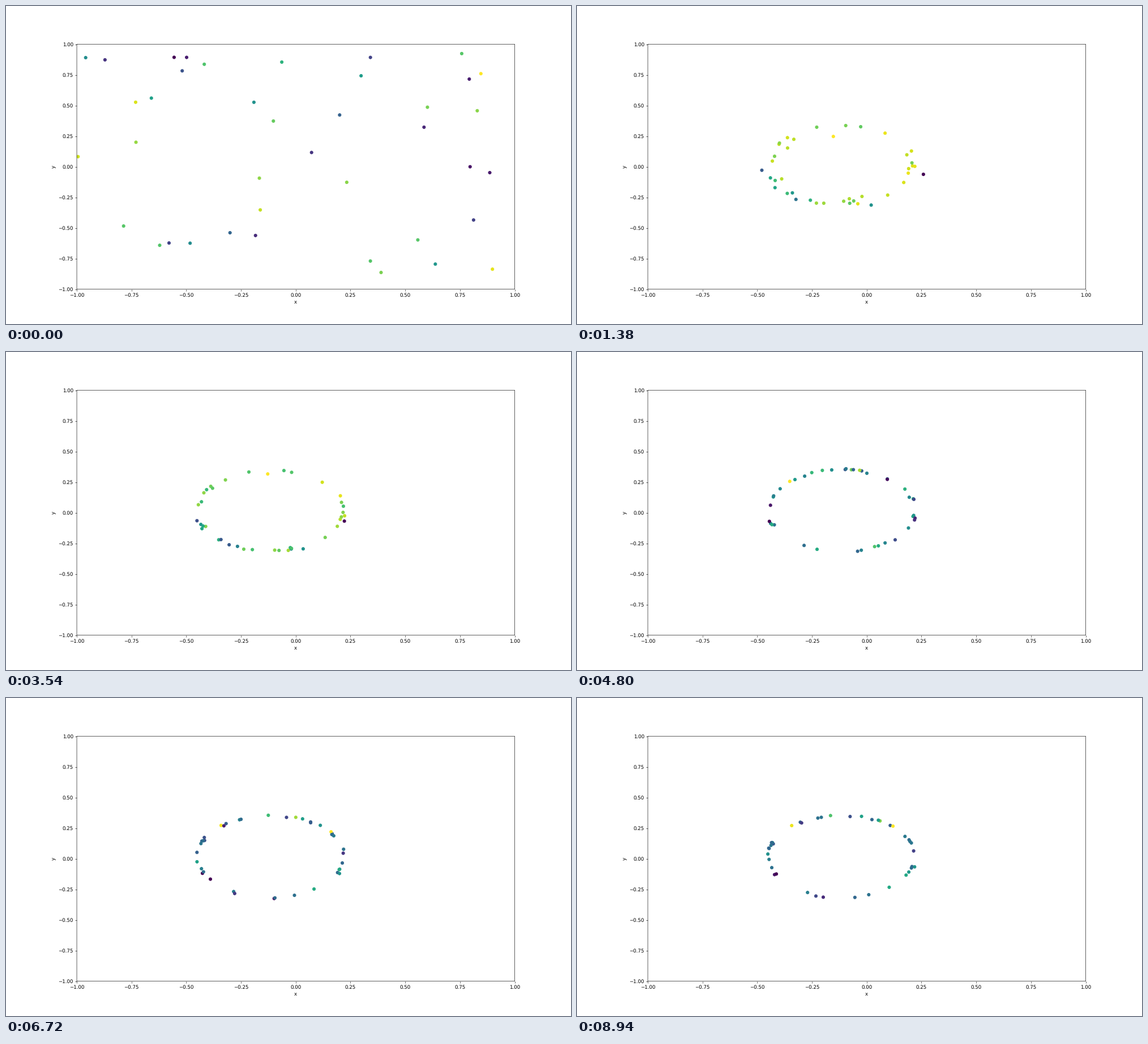
A matplotlib script for the animation above (9000 ms loop, 998 px wide and 561 px high).

```python
import numpy as np
import matplotlib.pyplot as plt
from matplotlib.animation import FuncAnimation

W, H, DPI = 998, 561, 62.375
FRAMES, STEP = 150, 60
COUNT = 40
CENTRE = np.array([-0.114, 0.016])
RADIUS = 0.336
SPIN = np.radians(9.93)   # orbit speed per frame
GATHER = 23               # frames until the swarm has formed a ring

# Soft thin lines and unhinted text
plt.rcParams.update({
    "path.snap": False, "text.hinting": "none", "axes.linewidth": 0.72,
    "xtick.major.width": 0.72, "ytick.major.width": 0.72})

rng = np.random.default_rng(12)
start = rng.uniform(-1, 1, (COUNT, 2))
height = rng.uniform(0, 1, COUNT)
dx, dy = ((start - CENTRE) / RADIUS).T
angle0, reach0 = np.arctan2(dy, dx), np.hypot(dx, dy)

sense = np.where(np.arange(COUNT) % 2, 1, -1)
speed = SPIN * (1 + rng.normal(0, 0.01, COUNT))
node = rng.uniform(0, 2 * np.pi, COUNT)
tilt = rng.normal(0, 0.3, COUNT)

# A few stragglers swing wide and low, a few others cut inside
rank = (np.arange(COUNT) + 0.5) / COUNT
stray = (-np.log(1 - rank))**1.2
dent = 0.35 * (1 - rank) * rng.uniform(0, 1, COUNT)**4


def state(n):
    """Positions and heights: fall inward, then circle both ways."""
    fade = max(0, 1 - n / GATHER)**3
    loose = min(1, np.exp((40 - n) / 16))
    turns = n * n / (2 * GATHER) if n < GATHER else n - GATHER / 2
    angle = angle0 + sense * speed * turns
    wave = np.cos(angle - node)

    ring = 1 + 0.02 * wave + loose * (0.03 * (stray - 1) - dent)
    reach = ring + (reach0 - ring) * fade
    pos = CENTRE + RADIUS * np.column_stack(
        [reach * np.cos(angle), reach * np.sin(angle)])
    z = tilt * wave - loose * stray
    return pos, z + (6 * height - z) * fade


fig, ax = plt.subplots(figsize=(W / DPI, (H + 0.01) / DPI), dpi=DPI)
fig.subplots_adjust(left=200.5 / 1600, right=1440.5 / 1600,
                    bottom=98.5 / 900, top=791.5 / 900)
ax.set(xlim=(-1, 1), ylim=(-1, 1), xlabel="x", ylabel="y")
pos, z = state(0)
dots = ax.scatter(pos[:, 0], pos[:, 1], c=z, cmap="viridis")


def draw(n):
    pos, z = state(n)
    dots.set_offsets(pos)
    dots.set_array(z)
    dots.set_clim(z.min(), z.max())
    return dots,


anim = FuncAnimation(fig, draw, frames=FRAMES, interval=STEP,
                     repeat=True, repeat_delay=0)
plt.show()
```
